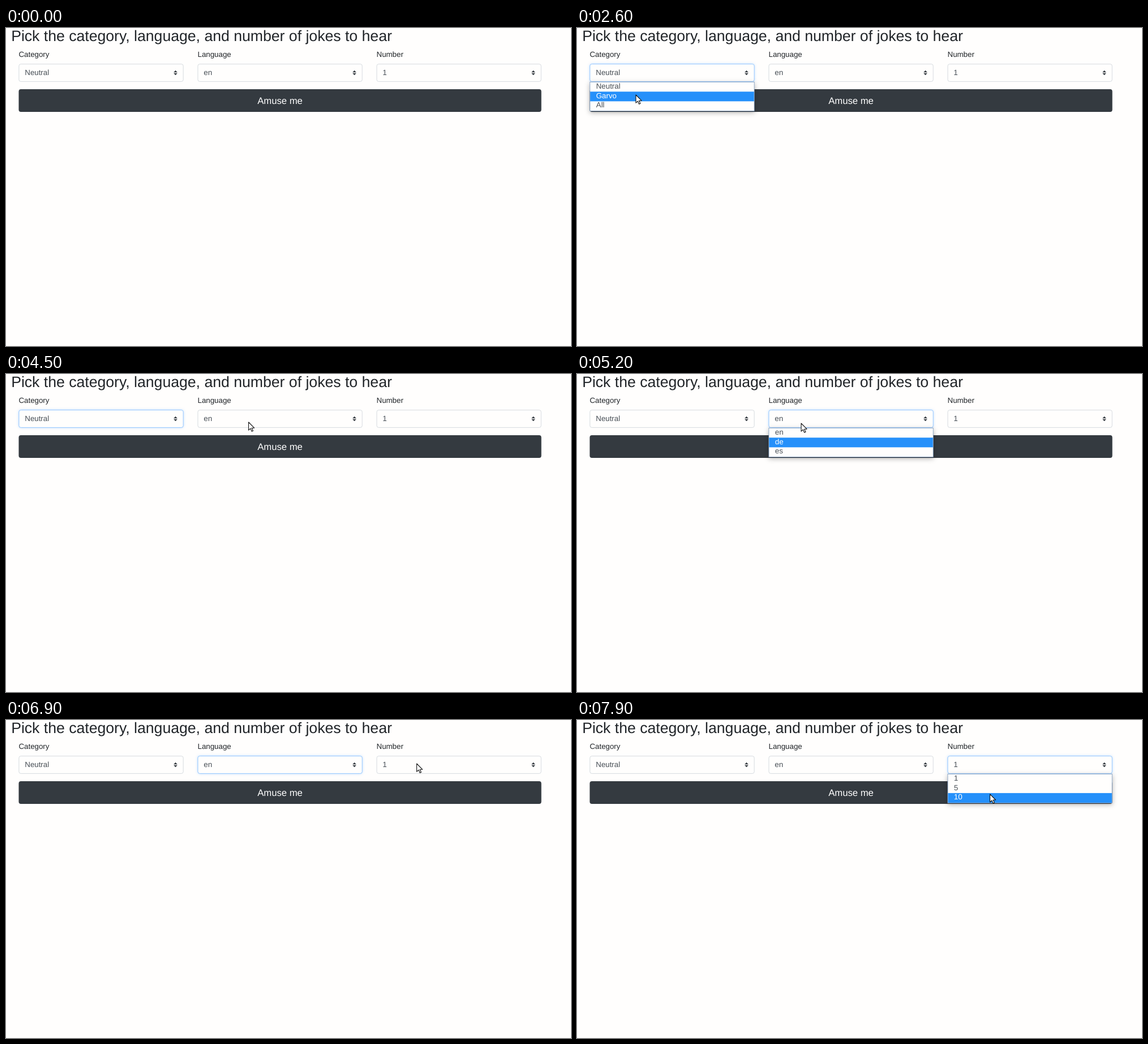
Animation of 998 by 561 pixels, one loop 8 s. Source, as an HTML page:

```html
<!DOCTYPE html>
<html lang="en">
<head>
<meta charset="utf-8">
<title>Joke picker</title>
<style>
  html, body { margin: 0; width: 100%; height: 100%; overflow: hidden; background: #fffefd; }
  svg { display: block; width: 100vw; height: 100vh; }
  text { font: 16px "Liberation Sans", Arial, sans-serif; fill: #495057; text-rendering: geometricPrecision; }
  .title { font-size: 32px; fill: #212529; }
  .label { fill: #212529; }
  .action { font-size: 20px; fill: #fff; text-anchor: middle; }
</style>
</head>
<body>
<svg viewBox="0 0 998 561" xmlns="http://www.w3.org/2000/svg">
  <defs>
    <filter id="glow" x="-5%" y="-40%" width="110%" height="180%">
      <feDropShadow dx="0" dy="0" stdDeviation="2.5" flood-color="#80bdff" flood-opacity=".5"/>
    </filter>
    <filter id="shadow" x="-8%" y="-40%" width="116%" height="190%">
      <feDropShadow dx="0" dy="3" stdDeviation="5" flood-color="#000" flood-opacity=".3"/>
    </filter>
  </defs>
  <g id="page"></g>
  <path id="pointer" d="M0 0V14.2L3.3 11.1L5.6 16.2L7.9 15.2L5.6 10.2H10Z"
        fill="#fff" stroke="#111" stroke-width="1.1" stroke-linejoin="round"/>
</svg>
<script>
const LOOP = 8000, STEP = 100;
const SCALE = 998 / 1200;               // the page is laid out 1200 units wide
const WIDTH = 350, GAP = 30, LEFT = 27;
const LIST_TOP = 115, ROW = 20;
const FIELD_Y = 75;                     // pointer height while resting on a field
const ARC = 12;                         // lift of the pointer between two fields

const page = document.getElementById('page');
const pointer = document.getElementById('pointer');
page.setAttribute('transform', `scale(${SCALE})`);

const fields = [
  { label: 'Category', options: ['Neutral', 'Garvo', 'All'], opens: 2000, closes: 4500 },
  { label: 'Language', options: ['en', 'de', 'es'], opens: 4800, closes: 6900 },
  { label: 'Number', options: ['1', '5', '10'], opens: 7000, closes: LOOP }
];

const optionY = row => 102 + 16 * row;
const glides = [];
let last = { x: 260, y: 586 };
function glide(start, steps, x, y = FIELD_Y) {
  const to = { x, y };
  glides.push({ start, steps, from: last, to });
  last = to;
}

glide(800, 5, 188);
glide(1400, 4, 297);
glide(2400, 3, 104, optionY(1));
glide(3000, 2, 108, optionY(2.5));
glide(3400, 4, 126);
glide(3900, 2, 458);
glide(4500, 1, 428.5, 85);
glide(4600, 1, 404);
glide(5000, 2, 397, optionY(.7));
glide(5200, 1, 396, 87);
glide(5500, 2, 398, optionY(2));
glide(6000, 2, 394, optionY(0));
glide(6400, 3, 647);
glide(6900, 1, 725.5, 77);
glide(7000, 2, 739);
glide(7400, 3, 934, optionY(0));
glide(7800, 2, 729.5, optionY(1.8));

function add(parent, tag, attrs, text) {
  const node = document.createElementNS('http://www.w3.org/2000/svg', tag);
  for (const key in attrs) node.setAttribute(key, attrs[key]);
  if (text) node.textContent = text;
  parent.appendChild(node);
  return node;
}

add(page, 'text', { x: 11, y: 27.9, class: 'title' }, 'Pick the category, language, and number of jokes to hear');
const button = add(page, 'rect', { x: LEFT, y: 130, width: 3 * WIDTH + 2 * GAP, height: 48, rx: 4.8 });
add(page, 'text', { x: 582, y: 160.8, class: 'action' }, 'Amuse me');

fields.forEach((f, i) => {
  f.x = LEFT + i * (WIDTH + GAP);
  add(page, 'text', { x: f.x, y: 61.2, class: 'label' }, f.label);
  f.box = add(page, 'rect', { x: f.x + .5, y: 76.5, width: WIDTH - 1, height: 37, rx: 4, fill: '#fffefd' });
  add(page, 'text', { x: f.x + 13, y: 100.2 }, f.options[0]);
  add(page, 'path', {
    d: 'M2 0L0 2h4zm0 5L0 3h4z', fill: '#343a40',
    transform: `translate(${f.x + WIDTH - 21} 90) scale(2)`
  });
});

for (const f of fields) {
  const rowsHeight = ROW * f.options.length;
  f.list = add(page, 'g', {});
  add(f.list, 'rect', {
    x: f.x + .5, y: LIST_TOP - .5, width: WIDTH - 1, height: rowsHeight + 1.5,
    fill: '#fffefd', stroke: '#7896ba', filter: 'url(#shadow)'
  });
  f.mark = add(f.list, 'rect', { x: f.x + 1, width: WIDTH - 2, height: ROW + .5, fill: '#2590fa' });
  f.rows = f.options.map((name, i) =>
    add(f.list, 'text', { x: f.x + 13.6, y: LIST_TOP + 13.7 + ROW * i }, name));
}

const easeOut = u => 1 - (1 - u) ** 2.2;

function pointerAt(t) {
  const g = glides.filter(g => g.start <= t).pop();
  if (!g) return null;
  const { from, to } = g;
  const u = easeOut(Math.min(1, (Math.floor((t - g.start) / STEP) + 1) / g.steps));
  const lift = from.y === FIELD_Y && to.y === FIELD_Y ? ARC * Math.sin(Math.PI * u) : 0;
  return { x: from.x + (to.x - from.x) * u, y: from.y + (to.y - from.y) * u - lift };
}

// The highlight stays on the option the pointer touched last.
function activeRow(f, t) {
  let row = 0;
  for (let s = f.opens; s <= t; s += STEP) {
    const over = Math.floor((pointerAt(s).y / SCALE - LIST_TOP) / ROW);
    if (over >= 0 && over < f.options.length) row = over;
  }
  return row;
}

function draw(t) {
  const p = pointerAt(t);
  pointer.setAttribute('visibility', p ? 'visible' : 'hidden');
  if (p) pointer.setAttribute('transform', `translate(${p.x} ${p.y})`);

  const focus = fields.filter(f => f.opens <= t).pop();
  const isOpen = focus && t < focus.closes;
  const hover = p && !isOpen && p.y > 108 && p.y < 148;
  button.setAttribute('fill', hover ? '#23272b' : '#343a40');

  for (const f of fields) {
    const focused = f === focus;
    f.box.setAttribute('stroke', focused ? '#80bdff' : '#ced4da');
    f.box.setAttribute('filter', focused ? 'url(#glow)' : 'none');
    f.list.setAttribute('display', focused && isOpen ? 'inline' : 'none');
  }
  if (!isOpen) return;
  const row = activeRow(focus, t);
  focus.mark.setAttribute('y', LIST_TOP + ROW * row);
  focus.rows.forEach((r, i) => { r.style.fill = i === row ? '#fff' : '#495057'; });
}

let origin;
function tick(now) {
  origin ??= now;
  draw((now - origin) % LOOP);
  requestAnimationFrame(tick);
}
draw(0);
requestAnimationFrame(tick);
</script>
</body>
</html>
```
